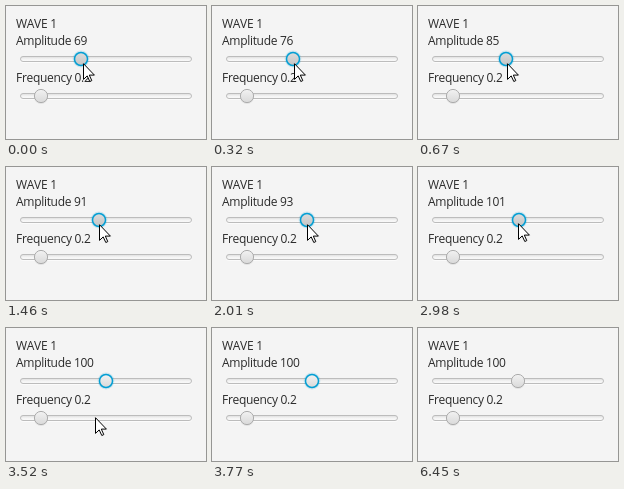
Animation of 200 by 133 pixels, one loop 8 s. Source, as an HTML page:

```html
<!DOCTYPE html>
<html lang="en">
<head>
<meta charset="utf-8">
<title>Wave sliders</title>
<style>
  html, body { margin: 0; width: 100%; height: 100%; overflow: hidden; background: #f4f4f4; }
  svg { display: block; width: 100%; height: 100%; }
  text { font: 12px "Open Sans", "Noto Sans", sans-serif; font-kerning: none; letter-spacing: -.3px; fill: #2b2b2b; }
</style>
</head>
<body>
<svg viewBox="0 0 200 133">
  <defs>
    <linearGradient id="groove" x2="0" y2="1">
      <stop offset="0" stop-color="#dcdcdc"/>
      <stop offset=".5" stop-color="#f4f4f4"/>
      <stop offset="1" stop-color="#fafafa"/>
    </linearGradient>
    <linearGradient id="body" x2="0" y2="1">
      <stop offset="0" stop-color="#f2f2f2"/>
      <stop offset="1" stop-color="#d9d9d9"/>
    </linearGradient>
    <linearGradient id="pressed" x2="0" y2="1">
      <stop offset="0" stop-color="#dcdcdc"/>
      <stop offset="1" stop-color="#c4c4c4"/>
    </linearGradient>
    <g id="track">
      <rect x="14" y="-2" width="172" height="6" rx="3" fill="#fbfbfb"/>
      <rect x="14.5" y="-2.5" width="171" height="5" rx="2.5" fill="url(#groove)" stroke="#bcbcbc"/>
    </g>
    <g id="plainThumb">
      <circle cy="1" r="7" fill="#000" opacity=".07"/>
      <circle r="6.6" fill="url(#body)" stroke="#acacac"/>
    </g>
  </defs>
  <rect width="200" height="133" fill="#f4f4f4"/>
  <text x="10" y="22">WAVE 1</text>
  <text id="amplitude" x="10" y="39"></text>
  <text x="10" y="76">Frequency 0.2</text>
  <use href="#track" y="53"/>
  <use href="#track" y="90"/>
  <use href="#plainThumb" x="35" y="90"/>
  <g id="thumb">
    <use id="idle" href="#plainThumb"/>
    <g id="focused">
      <circle r="8.4" fill="#039ed3" opacity=".16"/>
      <circle id="ring" r="6.5" stroke="#039ed3" stroke-width="1.5"/>
    </g>
  </g>
  <path id="cursor" d="M.5 .7V16.4L4.2 12.9L6.8 18.5L8.8 17.6L6.3 12.1H11.4Z" fill="#fff" stroke="#000"/>
</svg>
<script>
const LOOP = 8000, RELEASE = 3400, CURSOR_GONE = 3770, BLUR = 6450;
const PACE = 50; // ms per pixel of drag

// Where the drag pauses: arrival time and distance from the start
const stops = [
  [670, 13], [800, 15], [1050, 16], [1460, 18], [1600, 19],
  [1860, 20], [2250, 24], [2390, 27], [3030, 25]
];

const $ = id => document.getElementById(id);
const clamp = (v, lo, hi) => Math.min(hi, Math.max(lo, v));
const show = (id, on) => $(id).setAttribute("visibility", on ? "visible" : "hidden");
const place = (id, x, y) => $(id).setAttribute("transform", `translate(${x} ${y})`);

// Each stop is reached at a steady pace, one whole pixel at a time
function dragAt(t) {
  let at = 0, from = 0;
  for (const [arrival, to] of stops) {
    const distance = Math.abs(to - from);
    const left = clamp(Math.ceil((arrival - t) / PACE), 0, distance);
    at += Math.sign(to - from) * (distance - left);
    from = to;
  }
  return at;
}

function draw(t) {
  const drag = dragAt(t);
  const leave = clamp((t - RELEASE + PACE) / (CURSOR_GONE - RELEASE + PACE), 0, 1) * (t >= RELEASE);
  // one pixel of travel is 200 / 164 units
  $("amplitude").textContent = "Amplitude " + Math.round(69.1 + drag * 200 / 164);
  place("thumb", 75 + drag, 53);
  place("cursor", Math.round(77 + drag * .9 - 25 * leave), Math.round(57.4 - drag / 27 + 79 * leave));
  show("cursor", t < CURSOR_GONE);
  show("focused", t < BLUR);
  show("idle", t >= BLUR);
  $("ring").setAttribute("fill", t < RELEASE ? "url(#pressed)" : "url(#body)");
}

const begin = performance.now();
function tick() {
  draw((performance.now() - begin) % LOOP);
  requestAnimationFrame(tick);
}
tick();
</script>
</body>
</html>
```
